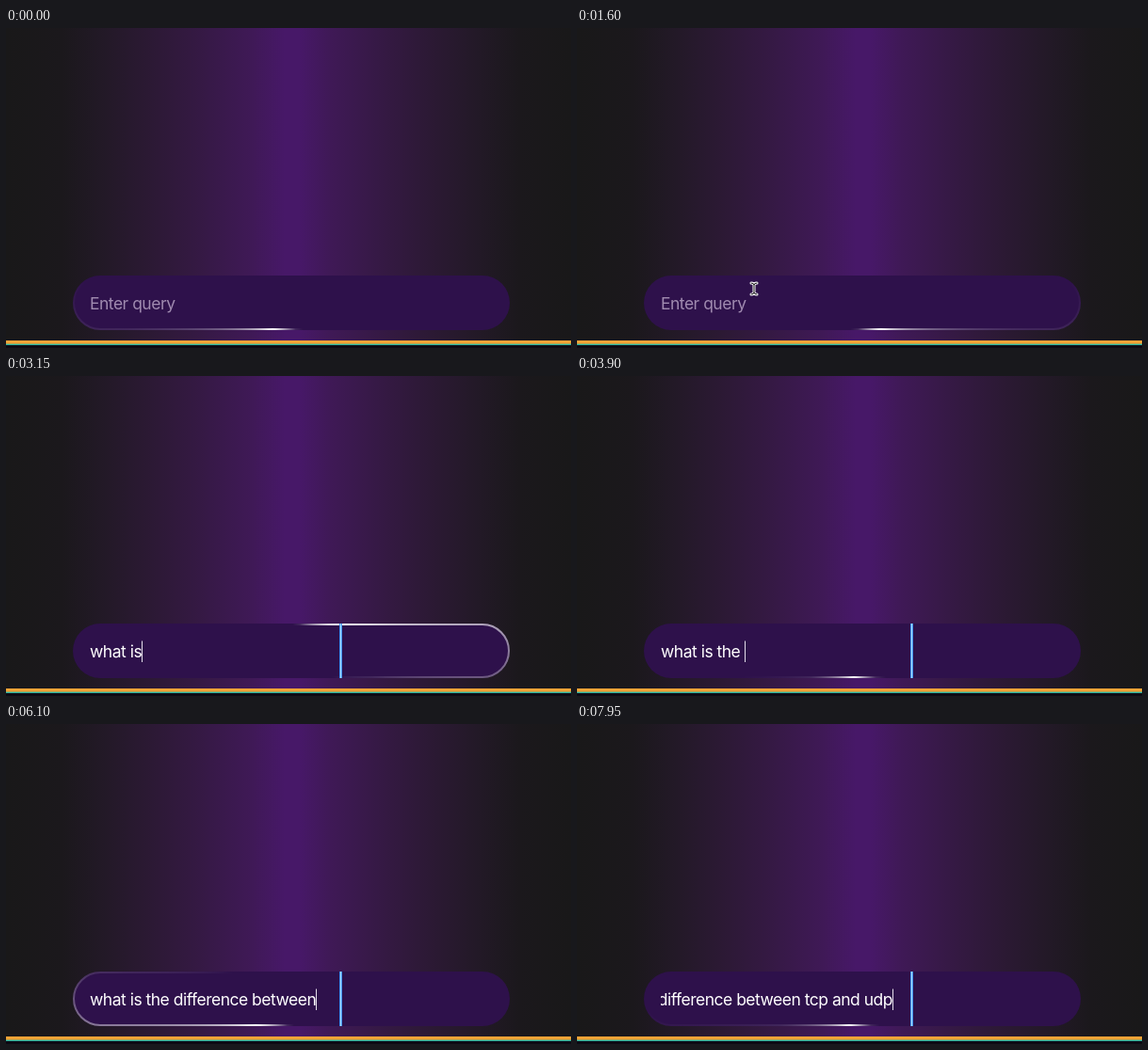
Recreate the animation shown at these times as an HTML page with a canvas. Size 600x340 px, loop 8 s.

```html
<!DOCTYPE html>
<html lang="en">
<head>
<meta charset="utf-8">
<title>Query field</title>
<style>
  html, body { margin: 0; width: 100%; height: 100%; overflow: hidden; background: #1a181a; }
  canvas { display: block; width: 600px; height: 340px; }
</style>
</head>
<body>
<canvas id="stage"></canvas>
<script>
const W = 600, H = 340, LOOP = 8000, TICK = 50;
const canvas = document.getElementById('stage');
const ctx = canvas.getContext('2d');
const ratio = window.devicePixelRatio || 1;
canvas.width = W * ratio;
canvas.height = H * ratio;
ctx.scale(ratio, ratio);

const pill = { x: 71, y: 263, w: 464, h: 58, r: 29 };
const field = { left: 89, right: 336, baseline: 299.3 };
const query = 'what is the difference between tcp and udp';

const FOCUS = 1850;
const POINTER = { start: 350, end: 1350, from: [600, 123], to: [188, 277] };
// [time, characters typed]
const typing = [[2300, 1], [3850, 12], [4900, 20], [6050, 30], [7850, 42]];

const backdrop = ctx.createLinearGradient(0, 0, W, 0);
[[0, '#191819'], [60, '#1b181c'], [100, '#221926'], [150, '#2b1933'],
 [200, '#341942'], [260, '#3f1956'], [296, '#471868'], [312, '#471868'],
 [345, '#3f1956'], [405, '#341942'], [455, '#2b1933'], [505, '#221926'],
 [545, '#1b181c'], [600, '#191819']]
  .forEach(([x, color]) => backdrop.addColorStop(x / W, color));

function rect(x, y, w, h, color) {
  ctx.fillStyle = color;
  ctx.fillRect(x, y, w, h);
}

function pillPath(inset) {
  ctx.beginPath();
  ctx.roundRect(pill.x + inset, pill.y + inset,
    pill.w - 2 * inset, pill.h - 2 * inset, pill.r - inset);
}

function drawScene() {
  rect(0, 0, W, H, backdrop);
  rect(0, 332, W, 4, '#f2a336');
  rect(0, 335.6, W, 1.4, '#27b3a4');
  rect(0, 337, W, 3, '#0d0a14');
  pillPath(0);
  ctx.fillStyle = '#2e114b';
  ctx.fill();
}

// A soft wedge of light sweeps the border once every two seconds.
function drawGlow(t) {
  const peak = 216 + t * 0.18;
  const glow = ctx.createConicGradient((peak - 270) * Math.PI / 180,
    pill.x + pill.w / 2, pill.y + pill.h / 2);
  [[-60, 0], [-45, 0.09], [0, 1], [45, 0.09], [60, 0]].forEach(([deg, alpha]) =>
    glow.addColorStop(0.5 + deg / 360, `rgba(255,255,255,${alpha})`));
  pillPath(1);
  ctx.strokeStyle = glow;
  ctx.lineWidth = 2;
  ctx.stroke();
}

function typedCount(t) {
  if (t < typing[0][0]) return 0;
  for (let i = 1; i < typing.length; i++) {
    const [t0, n0] = typing[i - 1], [t1, n1] = typing[i];
    if (t < t1) return Math.floor(n0 + (n1 - n0) * (t - t0) / (t1 - t0));
  }
  return query.length;
}

function drawField(t) {
  const typed = query.slice(0, typedCount(t));
  ctx.font = '17.5px Inter, Roboto, sans-serif';
  ctx.letterSpacing = '-0.5px';
  const width = ctx.measureText(typed).width;
  const shift = Math.min(0, field.right - 1 - field.left - width);

  ctx.save();
  ctx.beginPath();
  ctx.rect(field.left, pill.y, field.right - field.left + 1, pill.h);
  ctx.clip();
  ctx.fillStyle = typed ? '#fff' : '#a08bb0';
  ctx.fillText(typed || 'Enter query', field.left + shift, field.baseline);
  if (t >= FOCUS) {
    rect(Math.round(field.left + shift + width), 281.5, 1, 22.5, '#e4deea');
  }
  ctx.restore();

  if (t >= FOCUS) {
    rect(354, pill.y, 3, pill.h, '#3f92f2');
    rect(355, pill.y, 1, pill.h, '#a9dcff');
  }
}

function outlined(white, black) {
  ctx.lineCap = 'round';
  ctx.lineJoin = 'round';
  ctx.strokeStyle = '#fff';
  ctx.lineWidth = white;
  ctx.stroke();
  ctx.strokeStyle = '#111';
  ctx.lineWidth = black;
  ctx.stroke();
}

function drawArrow(x, y) {
  ctx.beginPath();
  [[0, 0], [0, 13], [3, 10.3], [5, 15], [7, 14], [5, 9.6], [9, 9.3]]
    .forEach(([dx, dy]) => ctx.lineTo(x + dx, y + dy));
  ctx.closePath();
  outlined(2, 0.5);
  ctx.fillStyle = '#111';
  ctx.fill();
}

function drawBeam(x, y) {
  ctx.beginPath();
  for (const s of [-1, 1]) {
    ctx.moveTo(x - 3, y + 6 * s);
    ctx.quadraticCurveTo(x, y + 6 * s, x, y + 4 * s);
    ctx.quadraticCurveTo(x, y + 6 * s, x + 3, y + 6 * s);
  }
  ctx.moveTo(x, y - 4);
  ctx.lineTo(x, y + 4);
  outlined(3, 1);
}

function drawPointer(t) {
  if (t < POINTER.start || t >= typing[0][0]) return;
  const p = Math.min(1, (t - POINTER.start) / (POINTER.end - POINTER.start));
  const ease = p * p * (3 - 2 * p);
  const [x, y] = POINTER.from.map((a, i) => a + (POINTER.to[i] - a) * ease);
  (y >= pill.y ? drawBeam : drawArrow)(x, y);
}

function frame(now) {
  const t = Math.floor((now % LOOP) / TICK) * TICK;
  drawScene();
  drawGlow(t);
  drawField(t);
  drawPointer(t);
  requestAnimationFrame(() => frame(performance.now() - start));
}

const start = performance.now();
frame(0);
</script>
</body>
</html>
```
